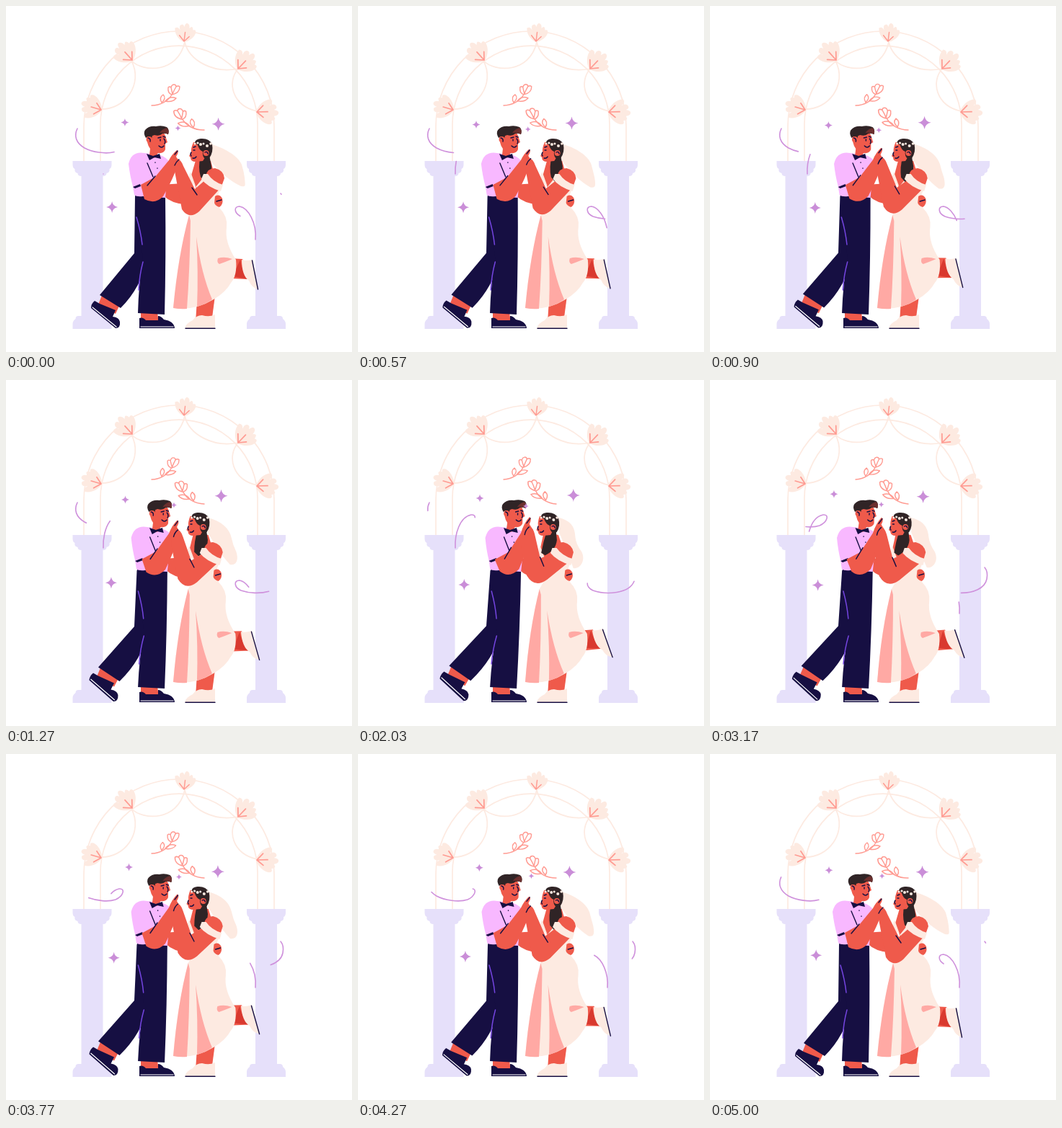
An HTML page for the animation above (5030 ms loop, 480 by 480 pixels).

```html
<!DOCTYPE html>
<html lang="en">
<head>
<meta charset="utf-8">
<title>Wedding dance</title>
<style>
html, body { margin: 0; width: 100%; height: 100%; overflow: hidden; background: #fff; }
svg { display: block; width: 100vw; height: 100vh; }
.line { fill: none; stroke-linecap: round; stroke-linejoin: round; }
.cream { fill: #fdeae1; }
.skin { fill: #ef5a4b; }
.deep { fill: #d9392f; }
.navy { fill: #160f42; }
.hair { fill: #302426; }
.pink { fill: #ffa9a4; }
.shirt { fill: #f8b8ff; }
.ink { stroke: #160f42; stroke-width: 1.4; }
.arch { stroke: #fdeae1; stroke-width: 1.7; }
.twig { stroke: #ff9b92; stroke-width: 1.4; }
.ribbon { stroke: #cf91dc; stroke-width: 1.6; stroke-dasharray: 48 52; }
.crease { stroke: #7445e0; stroke-width: 1.5; }
.star { fill: #ca8ed8; }
</style>
</head>
<body>
<svg viewBox="0 0 480 480">
  <defs>
    <g id="pillar" fill="#e6e0fa">
      <path d="M-27 215H27V220Q27 225 24 226Q25 231 20 232Q20 236 15 236V430H19Q23 430 23 434Q27 437 27 441V448H-27V441Q-27 437 -23 434Q-23 430 -19 430H-15V236Q-20 236 -20 232Q-25 231 -24 226Q-27 225 -27 220Z"/>
    </g>
    <g id="bloom">
      <path class="cream" d="M0 1C-7 -1 -14 -8 -14 -16Q-10 -19 -7 -14Q-10 -21 -5 -22Q-3 -22 -2 -19Q-1 -25 2 -24Q5 -23 5 -18Q9 -23 10 -16Q14 -18 14 -13C13 -7 7 -1 0 1Z"/>
      <path class="line twig" stroke-width="1.200" d="M0 0L-7 -7M0 0L0 -12M0 0L6 -7"/>
    </g>
    <g id="sprig" class="line twig">
      <path d="M0 0C12 0 23 -6 28 -15Q22 -17 23 -25Q25 -27 27 -25Q28 -29 31 -29Q34 -29 34 -26Q37 -28 39 -26Q39 -17 28 -15M27 -25Q28 -20 29 -16M34 -26Q31 -21 29 -16"/>
      <path d="M14 -4Q10 -11 16 -15Q21 -10 14 -4M19 -6Q25 -14 34 -10Q29 -4 19 -6"/>
    </g>
  </defs>

  <g class="line arch">
    <path d="M108 215V167A132 132 0 0 1 372 167V215M131 215V164A109 109 0 0 1 349 164V215"/>
    <path d="M130 143C165 145 191 108 174 76C190 92 238 94 248 50C254 76 288 94 322 87C306 106 314 138 348 146"/>
  </g>
  <use href="#bloom" transform="translate(132 144) rotate(-74) scale(1.2)"/>
  <use href="#bloom" transform="translate(175 75) rotate(-42) scale(1.25)"/>
  <use href="#bloom" transform="translate(247 49) rotate(7) scale(1.05)"/>
  <use href="#bloom" transform="translate(322 87) rotate(44) scale(1.25)"/>
  <use href="#bloom" transform="translate(348 147) rotate(89) scale(1.25)"/>
  <use href="#pillar" x="119.5"/>
  <use href="#pillar" x="361"/>

  <g id="sprigL"><use href="#sprig" transform="translate(202 138)"/></g>
  <g id="sprigR"><use href="#sprig" transform="translate(275 172) rotate(-2) scale(-1.06 1.06)"/></g>
  <path class="line ribbon" data-lead="0" pathLength="100" d="M135 233C134 214 141 190 157 187C166 186 163 197 152 202C140 206 120 203 109 197C97 190 94 180 99 170"/>
  <path class="line ribbon" data-lead="47" pathLength="100" d="M346 324C348 301 336 280 324 278C315 278 317 288 326 292C346 299 380 296 384 276Q386 266 381 260"/>

  <!-- far arm -->
  <g class="lean-man"><path class="skin" d="M214 248L246 246L252 275Q232 276 217 262Z"/></g>

  <!-- bride -->
  <path class="skin" d="M265 408L290 402L286 432L263 438Z"/>
  <path class="cream" d="M248 447Q250 440 259 436Q264 429 272 429Q282 432 290 428V447Z"/>
  <path class="line ink" d="M249 447.3H290"/>
  <g id="kick">
    <path class="skin" d="M309 350L328 351L336 379L312 378Z"/>
    <path class="deep" d="M325 352Q327 366 336 379Q324 377 315 375Q319 364 325 352Z"/>
    <path class="cream" d="M327 352Q333 354 342 352L350 393Q341 391 337 381Q327 374 327 352Z"/>
    <path class="line ink" d="M341.500 353L349.500 393"/>
  </g>
  <path class="cream" d="M282 191C302 196 322 208 327 220Q330 230 331 238C332 250 333 251 326 250Q304 240 281 212Z"
        data-to="M278 191C296 195 299 205 299 218Q300 228 308 238C315 250 306 264 296 262Q292 245 279 212Z"/>
  <g class="lean-chest"><path class="skin" d="M264 211L257 235L264 254L294 252L284 215Z"/></g>
  <g class="lean-bride">
    <path class="cream" d="M256 230Q251 240 257 246L264 250L272 240L297 255Q291 266 296 280Q308 292 306 307Q303 328 319 352Q321 374 312 384Q305 397 288 407Q262 423 232 419Q238 350 254 290Q264 275 266 258Z"/>
    <path class="pink" d="M254 290Q239 345 232 419Q242 421 251 420Q255 365 256 298Z"/>
    <path class="pink" d="M264 320Q267 370 265 417Q277 414 286 407Q271 372 264 320Z"/>
    <path class="pink" d="M294 350Q303 347 314 351Q302 356 296 358Q292 356 294 350Z"/>
    <path class="skin" d="M290 264Q296 260 300 267Q302 275 296 279Q290 277 289 273Z"/>
    <path class="line ink" d="M292 271L299 269"/>
  </g>
  <g class="lean-chest">
    <path class="hair" d="M270 208Q266 224 270 237L277 246Q287 236 285 222L281 202Z"
          data-to="M268 210Q262 224 257 240L262 243Q278 236 281 222L281 202Z"/>
    <path class="skin" d="M260 189Q256 198 257 203L254 208L256 210Q256 216 263 216L273 215L281 203L279 190Z"/>
    <path class="hair" d="M262 190Q262 185 270 184Q282 183 286 192Q288 203 282 211L276 212Q272 208 273 202Q268 200 266 193Z"/>
    <circle class="skin" cx="277.500" cy="204" r="4"/>
    <path class="line ink" d="M276 203Q279 201 280 205M260 196L263 195M260 200L262 200M257 203Q255 206 257 208M259 211Q262 212 264 209"/>
    <g class="cream">
      <circle cx="262" cy="191" r="1.500"/><circle cx="266" cy="190" r="1.600"/><circle cx="270" cy="192" r="2"/>
      <circle cx="274" cy="191" r="1.500"/><circle cx="279" cy="194" r="2"/><circle cx="284" cy="191" r="1.800"/>
    </g>
  </g>

  <!-- groom -->
  <path class="skin" d="M134 399L158 414L152 427L128 414Z" data-to="M130 395L155 412L148 424L124 409Z"/>
  <path class="navy" d="M123 409Q118 413 118 419L152 447Q159 447 158 438Q157 432 148 431L152 422L130 413Z"
        data-to="M119 404Q114 408 113 414L146 445Q153 445 153 436Q152 430 143 428L148 419L126 408Z"/>
  <path class="line" stroke="#fff" stroke-width="1.200" d="M120 418L153 445" data-to="M115.500 412.500L148 442.500"/>
  <path class="navy" d="M179 264L178 343L130 401L159 419Q188 390 196 350L208 268Z"
        data-to="M184 264L178 341L126 396L156 417Q189 386 198 350L213 268Z"/>
  <path class="skin" d="M187 425H210L212 439H187Z"/>
  <path class="navy" d="M185 447V433Q190 431 194 436H211V430Q215 430 219 435Q233 437 234 447Z"/>
  <path class="line" stroke="#fff" stroke-width="1.200" d="M187 445H232"/>
  <g class="lean-man">
    <path class="navy" d="M179 262L221 264Q222 350 220 428L183 426Q184 385 190 350Z"/>
    <path class="line crease" d="M181 293Q187 313 189 331M190 355Q185 374 184 394"/>
    <path class="shirt" d="M192 204Q174 201 170 219Q172 236 176 250L178 262Q181 265 190 264L221 266L225 214Q218 207 210 206Z"/>
    <path class="navy" d="M176 251L186 247L187 250L179 253Z"/>
    <path class="skin" d="M196 177Q194 190 200 198L199 207L206 211L211 204Q219 205 221 199L221 191L224 189L221 180L218 174Z"/>
    <path class="navy" d="M195 205L204 208L213 205L215 212L206 210L199 214Z"/>
    <path class="hair" d="M194 183Q190 176 193 172Q198 166 208 167Q216 165 223 168Q227 171 225 178Q221 176 217 177Q213 181 206 179L203 180L201 187L197 181Z"/>
    <path d="M213 176Q216 171 223 169Q227 172 225 178Q219 175 213 176Z" fill="#6b2f2e"/>
    <circle class="skin" cx="198.500" cy="185" r="4"/>
    <path class="line ink" d="M197 183Q201 184 200 188M211 183L215 182M218 181L221 182M214 185V187M219 184Q222 188 220 191M212 194Q216 198 219 194"/>
    <path class="line ink" d="M196 218L204 237M207 217V217.200M210 225V225.200"/>
  </g>

  <!-- joined arms -->
  <path class="skin" d="M187 248L207 237L226 214Q230 206 237 200Q241 201 236 209L240 216Q232 240 218 264Q207 276 192 268Z"
        data-to="M190 249L209 239L226 212Q230 198 238 189Q242 191 238 199L243 207Q236 232 224 262Q210 276 197 265Z"/>
  <path class="line ink" d="M234 206L238 201M207 236L196 249" data-to="M234 198L239 191M213 232L204 248"/>
  <path class="skin" d="M278 240L298 252L268 285Q254 297 244 282L233 224Q231 213 236 211Q243 213 246 222L262 254Z"
        data-to="M272 239L294 251L262 276Q244 289 233 270L226 235Q228 204 237 202Q243 204 245 213L252 247Z"/>
  <path class="line ink" d="M258 252L265 262M234 221Q236 216 240 213" data-to="M252 245L257 258M231 214Q232 207 237 203"/>
  <g class="lean-chest">
    <path class="skin" d="M277 236Q279 225 290 225Q302 228 303 239L298 253Z"/>
    <path class="cream" d="M274 233L280 233Q287 244 301 248L298 257Q279 251 271 240Z"/>
  </g>
  <g id="stars"></g>
</svg>
<script>
const LOOP = 5030;
const all = s => [...document.querySelectorAll(s)];
const set = (el, name, value) => el.setAttribute(name, value);
const wave = (phase, lag) => Math.cos(phase - lag * Math.PI / 180);

const numbers = /-?\d+(\.\d+)?/g;
const morphs = all('[data-to]').map(el => ({
  el, from: el.getAttribute('d'), to: el.dataset.to.match(numbers).map(Number)
}));

// size, then centre, reach and lag in degrees for x and y
const stars = [
  [5.5, 168, 4, 220, 161.5, 4.5, 90],
  [9, 296.2, 2.8, 125, 162, 2, -35],
  [8, 147.8, 2, 250, 282, 3, 195],
  [4, 236.5, 4, 300, 172, 3, 150]
].map(spec => {
  const el = document.createElementNS('http://www.w3.org/2000/svg', 'path');
  const r = spec[0], q = r * 0.14;
  set(el, 'class', 'star');
  set(el, 'd', `M0 ${-r}Q${q} ${-q} ${r} 0Q${q} ${q} 0 ${r}Q${-q} ${q} ${-r} 0Q${-q} ${-q} 0 ${-r}Z`);
  document.getElementById('stars').append(el);
  return { el, spec };
});

const ribbons = all('.ribbon');
const groom = all('.lean-man');
const bride = all('.lean-bride');
const chest = all('.lean-chest');
const [kick, sprigL, sprigR] = ['kick', 'sprigL', 'sprigR'].map(id => document.getElementById(id));

// Shear around a fixed ground line
const lean = (parts, ground, angle) => parts.forEach(el =>
  set(el, 'transform', `translate(0 ${ground}) skewX(${angle}) translate(0 ${-ground})`));

function draw(now) {
  const u = now % LOOP / LOOP;
  const phase = u * 2 * Math.PI;
  const sway = (1 - Math.cos(phase)) / 2;

  for (const { el, from, to } of morphs) {
    let i = 0;
    set(el, 'd', from.replace(numbers, n => (+n + (to[i++] - n) * sway).toFixed(2)));
  }
  lean(groom, 430, -1.95 * sway);
  lean(bride, 420, 1.1 * sway);
  lean(chest, 290, 5 * sway);
  set(kick, 'transform', `translate(0 ${-3 * sway}) rotate(${-9 * sway} 312 365)`);
  set(sprigL, 'transform', `rotate(${-4 * sway} 202 138)`);
  set(sprigR, 'transform', `rotate(${7 * sway} 275 172)`);

  for (const el of ribbons) el.style.strokeDashoffset = 48 - (u * 100 + +el.dataset.lead) % 100;
  for (const { el, spec: [, x, dx, lagX, y, dy, lagY] } of stars)
    set(el, 'transform', `translate(${x + dx * wave(phase, lagX)} ${y + dy * wave(phase, lagY)})`);

  requestAnimationFrame(draw);
}
draw(performance.now());
</script>
</body>
</html>
```
